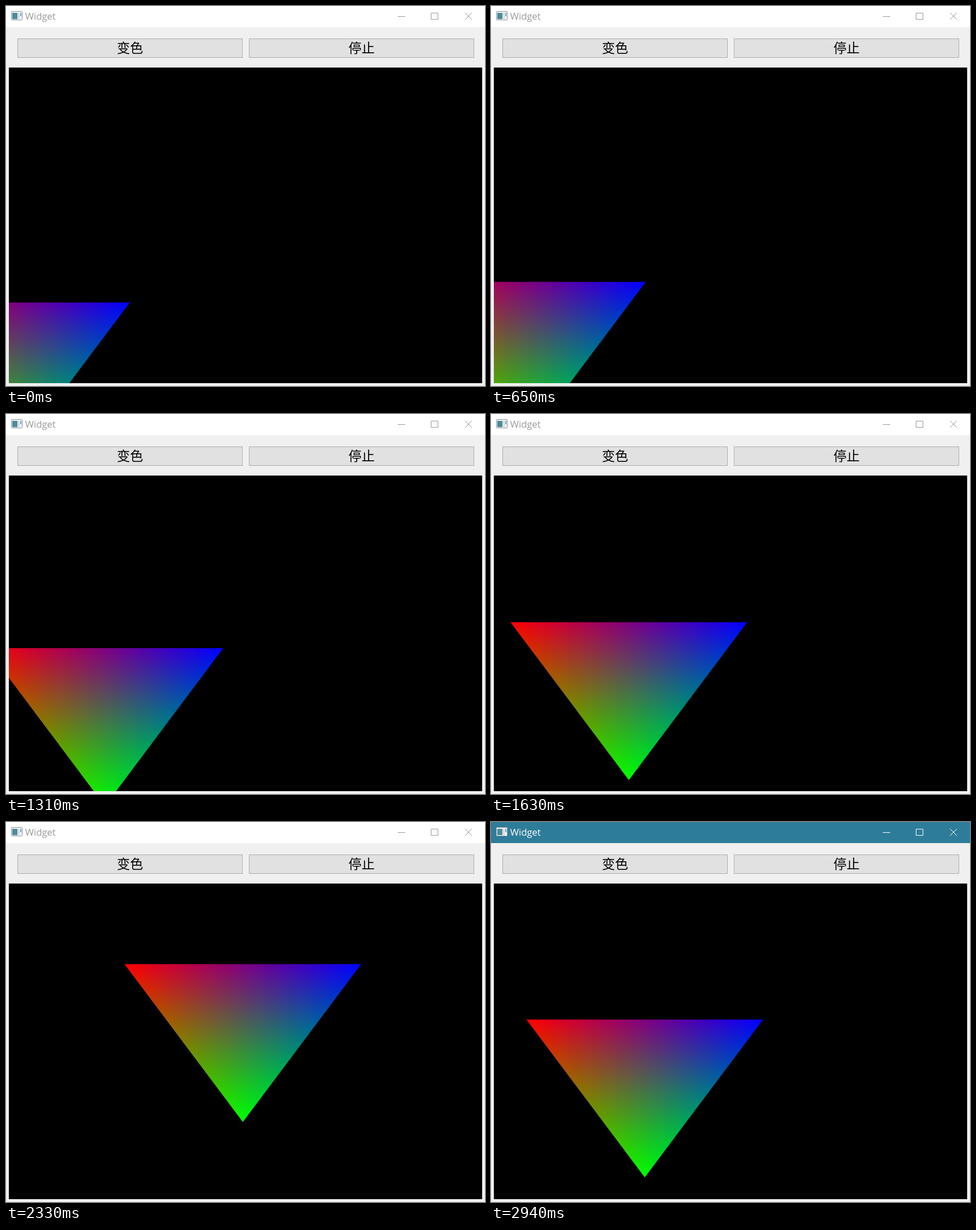
An HTML page with a canvas that plays this animation: 840x667 px, repeating every 2.99 s.

```html
<!DOCTYPE html>
<html lang="zh">
<head>
<meta charset="utf-8">
<style>
  html, body { margin: 0; width: 100%; height: 100%; overflow: hidden; background: #f0f0f0; }
  svg, canvas { position: absolute; display: block; }
  svg { left: 0; top: 0; }
  canvas { left: 5px; top: 108px; background: #000; }
  .bar { fill: #fff; }
  .title { font: 16.5px "Open Sans", "Noto Sans", sans-serif; fill: #999; }
  .controls { fill: none; stroke: #999; }
  .active .bar { fill: #2d7d9a; }
  .active .title { fill: #fff; }
  .active .controls { stroke: #fff; }
  .button rect { fill: #e1e1e1; stroke: #adadad; }
  .button text { font: 300 23px "Noto Sans CJK SC", "Noto Sans CJK", sans-serif; text-anchor: middle; fill: #000; }
</style>
</head>
<body>
<svg id="chrome" width="840" height="667" viewBox="0 0 840 667">
  <rect class="bar" width="840" height="37"/>
  <g>
    <rect x="9.5" y="9.5" width="19" height="15" rx="1" fill="#f4f4f4" stroke="#8a8f96"/>
    <rect x="11" y="12" width="9" height="11" fill="#4b8c98"/>
    <rect x="21" y="12" width="3" height="11" fill="#d5d9dc"/>
    <rect x="25" y="12" width="2" height="6" fill="#7ba4c4"/>
  </g>
  <text class="title" x="33.5" y="23.5">Widget</text>
  <path class="controls" d="M687 18.5H700M745.5 12.5H757.5V23.5H745.5ZM805 12L817 24M817 12L805 24"/>
  <g class="button">
    <rect x="20.5" y="57.5" width="394" height="33"/>
    <text x="217.5" y="82">变色</text>
  </g>
  <g class="button">
    <rect x="426.5" y="57.5" width="394" height="33"/>
    <text x="623.5" y="82">停止</text>
  </g>
</svg>
<canvas id="view" width="830" height="554"></canvas>
<script>
const LOOP = 2990;
const W = 830, H = 554;
const SPEED = 0.0006; // radians per ms
const chrome = document.getElementById("chrome");
const ctx = document.getElementById("view").getContext("2d");

// Ticks repeat in a 50, 40, 50 ms rhythm.
function snap(ms) {
  const rest = ms % 140;
  return ms - rest + (rest < 50 ? 0 : rest < 90 ? 50 : 90);
}

// The swing turns at its top, slightly early on the way back.
function offset(ms) {
  const k = Math.min(1, Math.max(0, (ms - 2290) / 90));
  const turn = 2370 - 48 * k;
  return -Math.abs(Math.sin((ms - turn) * SPEED));
}

// Fade a colour from corner p to the opposite side a-b.
function fade(p, a, b, colour) {
  const dx = b[0] - a[0], dy = b[1] - a[1];
  const k = ((p[0] - a[0]) * dx + (p[1] - a[1]) * dy) / (dx * dx + dy * dy);
  const g = ctx.createLinearGradient(p[0], p[1], a[0] + k * dx, a[1] + k * dy);
  g.addColorStop(0, colour);
  g.addColorStop(1, "#000");
  return g;
}

function drawTriangle(t) {
  const cx = W / 2 * (1 + t), cy = H / 2 * (1 - t);
  const red = [cx - W / 4, cy - H / 4];
  const blue = [cx + W / 4, cy - H / 4];
  const green = [cx, cy + H / 4];

  ctx.globalCompositeOperation = "source-over";
  ctx.fillStyle = "#000";
  ctx.fillRect(0, 0, W, H);
  ctx.globalCompositeOperation = "lighter";
  ctx.beginPath();
  for (const p of [red, blue, green]) ctx.lineTo(...p);
  ctx.closePath();
  const fills = [
    fade(red, blue, green, "#f00"),
    fade(green, red, blue, "#0f0"),
    fade(blue, green, red, "#00f")
  ];
  for (const fill of fills) {
    ctx.fillStyle = fill;
    ctx.fill();
  }
}

function render(now) {
  const ms = snap(now % LOOP);
  chrome.classList.toggle("active", ms >= 2940);
  drawTriangle(offset(ms));
}

const start = performance.now();
function tick() {
  render(performance.now() - start);
  requestAnimationFrame(tick);
}
tick();
</script>
</body>
</html>
```
